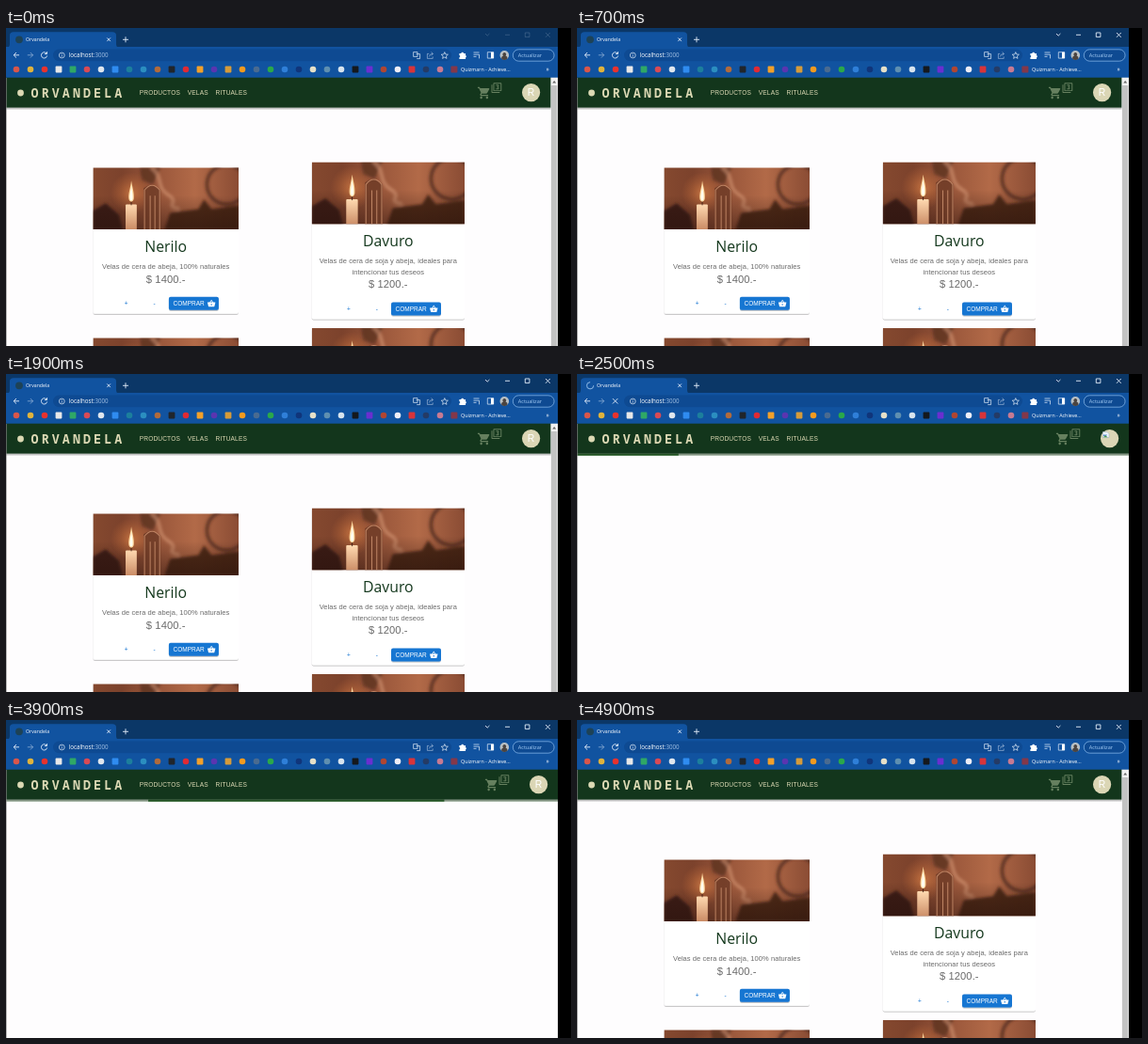
An HTML page for the animation above (5 s loop, 600 px wide and 338 px high).

```html
<!DOCTYPE html>
<html lang="es">
<head>
<meta charset="utf-8">
<title>Orvandela</title>
<style>
  html, body { margin: 0; width: 100%; height: 100%; overflow: hidden; background: #000; }
  svg { display: block; }
  text { white-space: pre; }
  .ui { font-family: "Open Sans", "Noto Sans", sans-serif; }
  .page { font-family: "Liberation Sans", Arial, sans-serif; }
  .brand { font: 600 13.3px "Noto Sans Mono", monospace; letter-spacing: 3.1px; fill: #dcd9b4; }
  .nav { font-size: 6.6px; letter-spacing: .14px; fill: #dcd9b4; }
  .title { font: 15.8px "Open Sans", "Noto Sans", sans-serif; fill: #14381d; }
  .desc { font-size: 7.5px; letter-spacing: .075px; fill: #6a6a6a; }
  .price { font-size: 11.2px; letter-spacing: .08px; fill: #6a6a6a; }
  .btn { font-size: 6.5px; }
  .mid { text-anchor: middle; }
  .line { fill: none; stroke: #e4eefa; stroke-width: .9; }
</style>
</head>
<body>
<svg id="stage" width="600" height="338" viewBox="0 0 600 338">
  <defs>
    <linearGradient id="wall">
      <stop offset="0" stop-color="#85492f"/>
      <stop offset=".2" stop-color="#7c422c"/>
      <stop offset=".45" stop-color="#9a573b"/>
      <stop offset=".7" stop-color="#b26a48"/>
      <stop offset="1" stop-color="#8a4c34"/>
    </linearGradient>
    <linearGradient id="shade" x2="0" y2="1">
      <stop offset=".45" stop-color="#2a120c" stop-opacity="0"/>
      <stop offset="1" stop-color="#2a120c" stop-opacity=".5"/>
    </linearGradient>
    <linearGradient id="wax" x2="0" y2="1">
      <stop offset="0" stop-color="#ffd9b0"/>
      <stop offset="1" stop-color="#c98a64"/>
    </linearGradient>
    <radialGradient id="glow">
      <stop offset="0" stop-color="#ff9a50" stop-opacity=".5"/>
      <stop offset="1" stop-color="#e07a3c" stop-opacity="0"/>
    </radialGradient>
    <linearGradient id="drop" x2="0" y2="1">
      <stop offset="0" stop-color="#000" stop-opacity=".34"/>
      <stop offset="1" stop-color="#000" stop-opacity="0"/>
    </linearGradient>
    <filter id="soft" x="-30%" y="-30%" width="160%" height="160%"><feGaussianBlur stdDeviation="1.6"/></filter>
    <filter id="lift" x="-5%" y="-5%" width="110%" height="112%">
      <feDropShadow dx="0" dy=".8" stdDeviation=".7" flood-opacity=".34"/>
    </filter>
    <clipPath id="window"><rect width="586" height="338"/></clipPath>
    <symbol id="photo" viewBox="0 0 155 65.5" preserveAspectRatio="xMidYMid slice">
      <rect width="155" height="65.5" fill="url(#wall)"/>
      <g filter="url(#soft)">
        <path d="M0 46L14 38 28 50 32 66H0z" fill="#3a1c13"/>
        <path d="M50 0H72L64 18 52 14z" fill="#552c1f" opacity=".7"/>
        <path d="M62 0C76 10 66 20 80 29S74 40 92 44" fill="none" stroke="#dda07c" stroke-width="4" opacity=".5"/>
        <circle cx="142" cy="18" r="21" fill="none" stroke="#4d271b" stroke-width="4" opacity=".7"/>
        <path d="M76 66L82 48 112 44 118 34 126 44 155 40V66z" fill="#3d1d13" opacity=".85"/>
      </g>
      <rect width="155" height="65.5" fill="url(#shade)"/>
      <circle cx="41" cy="27" r="22" fill="url(#glow)"/>
      <path d="M54 22Q63 14 72 24V66H54z" fill="#6a3825" opacity=".75"/>
      <path d="M55 66V24Q63 14 71 24V66M61 30V66M66 30V66" fill="none" stroke="#dfa27c" stroke-width="1" opacity=".7"/>
      <rect x="35" y="39" width="11.8" height="27" rx="1" fill="url(#wax)"/>
      <path d="M41 40V36" stroke="#3a1a10" stroke-width=".8"/>
      <path d="M41 14C42.4 22 44.2 27 43.7 33 43 37.4 39 37.4 38.3 33 37.8 27 40.2 22 41 14z" fill="#ffd9a0"/>
      <path d="M41 19C42 26 42.9 29 42.5 33 42 36 40 36 39.5 33 39.1 29 40.4 26 41 19z" fill="#fffdf0"/>
    </symbol>
    <path id="cart" d="M7 18c-1.1 0-1.99.9-1.99 2S5.9 22 7 22s2-.9 2-2-.9-2-2-2zM1 2v2h2l3.6 7.59-1.35 2.45c-.16.28-.25.61-.25.96 0 1.1.9 2 2 2h12v-2H7.42c-.14 0-.25-.11-.25-.25l.03-.12.9-1.63h7.45c.75 0 1.41-.41 1.75-1.03l3.58-6.49c.08-.14.12-.31.12-.48 0-.55-.45-1-1-1H5.21l-.94-2H1zm16 16c-1.1 0-1.99.9-1.99 2s.89 2 1.99 2 2-.9 2-2-.9-2-2-2z"/>
    <path id="count" d="M21 1H7c-1.1 0-2 .9-2 2v14c0 1.1.9 2 2 2h14c1.1 0 2-.9 2-2V3c0-1.1-.9-2-2-2zm0 16H7V3h14v14zM3 5H1v16c0 1.1.9 2 2 2h16v-2H3V5zm14 8v-1.5c0-.83-.67-1.5-1.5-1.5.83 0 1.5-.67 1.5-1.5V7c0-1.11-.9-2-2-2h-4v2h4v2h-2v2h2v2h-4v2h4c1.1 0 2-.89 2-2z"/>
    <path id="basket" d="M17.21 9l-4.38-6.56c-.19-.28-.51-.42-.83-.42-.32 0-.64.14-.83.43L6.79 9H2c-.55 0-1 .45-1 1 0 .09.01.18.04.27l2.54 9.27c.23.84 1 1.46 1.92 1.46h13c.92 0 1.69-.62 1.93-1.46l2.54-9.27L23 10c0-.55-.45-1-1-1h-4.79zM9 9l3-4.4L15 9H9zm3 8c-1.1 0-2-.9-2-2s.9-2 2-2 2 .9 2 2-.9 2-2 2z"/>
  </defs>

  <rect width="600" height="338"/>
  <g clip-path="url(#window)">
    <rect y="52" width="586" height="286" fill="#fefdfe"/>

    <g id="shop" class="page">
      <g id="cards"></g>
      <rect x="578.4" y="52" width="7.6" height="286" fill="#f1f1f1"/>
      <path d="M580.2 58.5L582.2 56 584.2 58.5z" fill="#666"/>
      <rect x="579" y="61" width="6.4" height="277" fill="#c3c3c3"/>
    </g>

    <g id="loader">
      <rect y="84.5" width="586" height="2.2" fill="#a9bfa8"/>
      <rect id="barA" y="84.5" height="2.2" fill="#2c6a2d"/>
      <rect id="barB" y="84.5" height="2.2" fill="#2c6a2d"/>
    </g>

    <g class="page">
      <rect id="shadow" y="84.5" height="3" fill="url(#drop)"/>
      <rect id="header" y="52" height="32.6" fill="#13361c"/>
      <circle cx="15.5" cy="69" r="3.4" fill="#dcd9b4"/>
      <text class="brand" x="26.6" y="73.5">ORVANDELA</text>
      <g class="nav">
        <text x="141.7" y="71">PRODUCTOS</text>
        <text x="192.8" y="71">VELAS</text>
        <text x="222.6" y="71">RITUALES</text>
      </g>
      <g id="tools">
        <g fill="#66805f">
          <use href="#cart" transform="translate(500.3 61.6) scale(.62)"/>
          <use href="#count" transform="translate(515 57.8) scale(.49)"/>
        </g>
        <circle cx="557.6" cy="68.6" r="9.6" fill="#dbd6b5"/>
        <text id="initial" class="mid" x="557.6" y="72.3" font-size="10.4" fill="#fff">R</text>
        <g id="broken">
          <path d="M550.4 61.6h4.6l2 2v4h-6.6z" fill="#eef4fb" stroke="#8fa3b5" stroke-width=".5"/>
          <path d="M551 64.4h4l-1 1.6h-3z" fill="#5b8fd0"/>
          <path d="M551 67.2l2-2 2.6 2z" fill="#4b9a4b"/>
        </g>
      </g>
      <rect y="53" width=".6" height="285" fill="#8c8c8c"/>
    </g>

    <g class="ui">
      <rect width="586" height="20.5" fill="#0b3767"/>
      <path d="M1 20.5Q4 20.5 4 17V8Q4 4.3 8 4.3H113Q117 4.3 117 8V17Q117 20.5 120 20.5z" fill="#1153a0"/>
      <rect y="20" width="586" height="32.7" fill="#1153a0"/>
      <rect x="50" y="22.6" width="423" height="12.6" rx="6.3" fill="#0e4a92"/>
      <circle id="favicon" cx="14" cy="12.3" r="3.9" fill="#1d4256"/>
      <path id="spinner" class="line" d="M0 -3.6A3.6 3.6 0 1 0 3.6 0" style="stroke:#9cc4ee"/>
      <text x="21" y="14.3" font-size="5.2" fill="#fff">Orvandela</text>
      <path class="line" d="M107.3 10.5l3.6 3.6m0-3.6l-3.6 3.6M124 12.3h6m-3-3v6"/>
      <path id="controls" class="line" d="M509 6l2.2 2.2L513.4 6M530 7.3h5M551.3 5h4.6v4.6h-4.6zM573 5l4.8 4.8m0-4.8L573 9.8"/>

      <path class="line" d="M14 28.8H8.2m2.8-2.8L8.2 28.8l2.8 2.8"/>
      <path class="line" d="M22.8 28.8h5.8m-2.8-2.8l2.8 2.8-2.8 2.8" opacity=".5"/>
      <path id="reload" class="line" d="M43 27A3.1 3.1 0 1 0 43.6 29.5M43.5 25.2V27.6H41"/>
      <path id="stop" class="line" d="M37.9 26.1l5.4 5.4m0-5.4l-5.4 5.4"/>
      <circle class="line" cx="59.3" cy="29" r="2.9" style="stroke-width:.7"/>
      <path class="line" d="M59.3 28.6v2M59.3 27v.8" style="stroke-width:.7"/>
      <text x="66.8" y="31" font-size="6.2" fill="#fff">localhost<tspan fill="#a5c3e6">:3000</tspan></text>

      <g class="line" style="stroke-width:.7">
        <path d="M432.6 25.6h4.4v4.8h-4.4zM435.6 27.6h4v5h-3.4"/>
        <path d="M449.2 27.4h-1.8v5h5.8v-2M449.4 30.4q.4-3 3.6-3m-1.4-1.8l2 1.8-2 1.8" opacity=".65"/>
        <path d="M465.8 25.6l1 2.4 2.6.2-2 1.7.6 2.5-2.2-1.4-2.2 1.4.6-2.5-2-1.7 2.6-.2z"/>
        <path d="M496.5 26h6M496.5 28.2h6M496.5 30.4h3M502.5 32.4v-4.2"/>
        <path d="M511.3 25.7h6.4v6.4h-6.4z"/>
      </g>
      <rect x="515" y="25.7" width="2.9" height="6.4" fill="#fff"/>
      <path d="M481.4 27h2a1.3 1.3 0 0 1 2.6 0h2v2a1.3 1.3 0 0 1 0 2.4V33h-6.6v-1.8a1.2 1.2 0 0 0 0-2.3z" fill="#fff"/>
      <circle cx="529.3" cy="28.9" r="4.8" fill="#b9c0c4"/>
      <path d="M526 32.4q0-2.6 2-3a1.9 1.9 0 1 1 2.6 0q2 .4 2 3a4.8 4.8 0 0 1-6.6 0z" fill="#4b4440"/>
      <rect x="538.3" y="22.8" width="43.8" height="12.4" rx="6.2" fill="#0e4a92" stroke="#7fb2e6" stroke-width=".8"/>
      <text x="543.8" y="31" font-size="5.5" fill="#a9d0f8">Actualizar</text>

      <g id="bookmarks"></g>
      <rect x="472.4" y="40.6" width="7" height="7" rx="1" fill="#83384a"/>
      <text x="483" y="46" font-size="5.35" fill="#fff">Quizmarn - Achieve...</text>
      <text x="573.6" y="46" font-size="6.5" fill="#fff">»</text>
    </g>
  </g>
</svg>
<script>
const LOOP = 5000, STEP = 100;
const FOCUS = 200, LOAD = 2400, BLANK = 2500, READY = 2800, SHOWN = 4400;
const WIDTH = 586, SHOP_WIDTH = 578.4, CYCLE = 2100, SWEEP = 1260;
const $ = id => document.getElementById(id);
const show = (id, on) => $(id).setAttribute('visibility', on ? 'visible' : 'hidden');

const iconColors = ('#d8564a #e0b33c #e8322d #e8e8e8 #2fa866 #d84a55 #dfe6ee #2f8cf0 #1c7f9c #2b8ec0 #b06a3c ' +
  '#20252b #e02a34 #f2a02a #5a35b0 #d59b3a #f39a1f #4a6b90 #2aa84a #2f7fd8 #10357a #e6e0c8 #5f8fb0 #d8e4ee ' +
  '#15181c #6a2fd0 #b04632 #eeeef6 #d8343a #243b66 #c77a92').split(' ');
const squares = [3, 4, 7, 11, 13, 15, 24, 25, 28];
$('bookmarks').innerHTML = iconColors.map((color, i) => {
  const x = 11 + 15 * i;
  return squares.includes(i)
    ? `<rect x="${x - 3.4}" y="40.6" width="6.8" height="6.8" rx=".8" fill="${color}"/>`
    : `<circle cx="${x}" cy="44" r="3.3" fill="${color}"/>`;
}).join('');

const label = (cls, x, y, s, extra = '') => `<text class="${cls} mid" x="${x}" y="${y}" ${extra}>${s}</text>`;

function card(x, y, w, h, name, lines, price) {
  const mid = x + w / 2, photoH = 65.8;
  const base = y + photoH;
  const end = base + 42 + 11.4 * (lines.length - 1);
  const row = y + h - 11;
  return `<rect x="${x}" y="${y}" width="${w}" height="${h}" rx="2" fill="#fff" filter="url(#lift)"/>
    <svg x="${x}" y="${y}" width="${w}" height="${photoH}"><use href="#photo" width="${w}" height="${photoH}"/></svg>
    ${label('title', mid, base + 23.8, name)}
    ${lines.map((s, i) => label('desc', mid, base + 42 + 11.4 * i, s)).join('')}
    ${label('price', mid, end + 14.6, price)}
    ${label('btn', mid - 42, row + 2.2, '+', 'fill="#1976d2"')}
    ${label('btn', mid - 12, row + 2.2, '-', 'fill="#1976d2"')}
    <rect x="${mid + 3.2}" y="${row - 7}" width="53" height="14" rx="2" fill="#1976d2" filter="url(#lift)"/>
    <text class="btn" x="${mid + 7.8}" y="${row + 2.3}" fill="#fff">COMPRAR</text>
    <use href="#basket" fill="#fff" transform="translate(${mid + 43.9} ${row - 4.6}) scale(.38)"/>`;
}

const bee = ['Nerilo', ['Velas de cera de abeja, 100% naturales'], '$ 1400.-'];
const soy = ['Davuro', ['Velas de cera de soja y abeja, ideales para', 'intencionar tus deseos'], '$ 1200.-'];
$('cards').innerHTML =
  card(92.4, 148.2, 154.6, 155.6, ...bee) + card(324.6, 142.6, 162.4, 167, ...soy) +
  card(92.4, 329.2, 154.6, 155.6, ...bee) + card(324.6, 319, 162.4, 167, ...soy);

// Cubic Bézier easing solved by bisection
function ease(x1, y1, x2, y2) {
  const at = (a, b, s) => 3 * (1 - s) ** 2 * s * a + 3 * (1 - s) * s * s * b + s ** 3;
  return x => {
    let lo = 0, hi = 1;
    for (let i = 0; i < 24; i++) {
      const s = (lo + hi) / 2;
      if (at(x1, x2, s) < x) lo = s; else hi = s;
    }
    return at(y1, y2, lo);
  };
}
const easeA = ease(.65, .815, .735, .395), easeB = ease(.165, .84, .44, 1);

function sweep(id, t, easing, from, to) {
  const p = t < 0 ? 0 : easing(Math.min(1, (t % CYCLE) / SWEEP));
  const edge = i => Math.max(0, Math.min(1, from[i] + (to[i] - from[i]) * p)) * WIDTH;
  $(id).setAttribute('x', edge(0));
  $(id).setAttribute('width', edge(1) - edge(0));
}

function draw(t) {
  const blank = t >= BLANK && t < SHOWN;
  const busy = t >= LOAD && t < READY;
  const fallback = t >= BLANK && t < READY;
  show('shop', !blank);
  show('loader', blank);
  show('favicon', !busy);
  show('spinner', busy);
  show('reload', !busy);
  show('stop', busy);
  show('initial', !fallback);
  show('broken', fallback);
  $('controls').setAttribute('opacity', t < FOCUS ? .2 : 1);
  for (const id of ['header', 'shadow']) $(id).setAttribute('width', blank ? WIDTH : SHOP_WIDTH);
  $('tools').setAttribute('transform', `translate(${blank ? 8 : 0} 0)`);
  $('spinner').setAttribute('transform', `translate(14 12.3) rotate(${(t - BLANK) * .36})`);
  sweep('barA', t - LOAD, easeA, [-.35, 0], [1, 1.9]);
  sweep('barB', t - LOAD - 1150, easeB, [-2, 0], [1.07, 1.08]);
}

const start = performance.now();
function tick(now) {
  const t = Math.max(0, now - start) % LOOP;
  draw(Math.floor(t / STEP) * STEP);
  requestAnimationFrame(tick);
}
draw(0);
requestAnimationFrame(tick);
</script>
</body>
</html>
```
